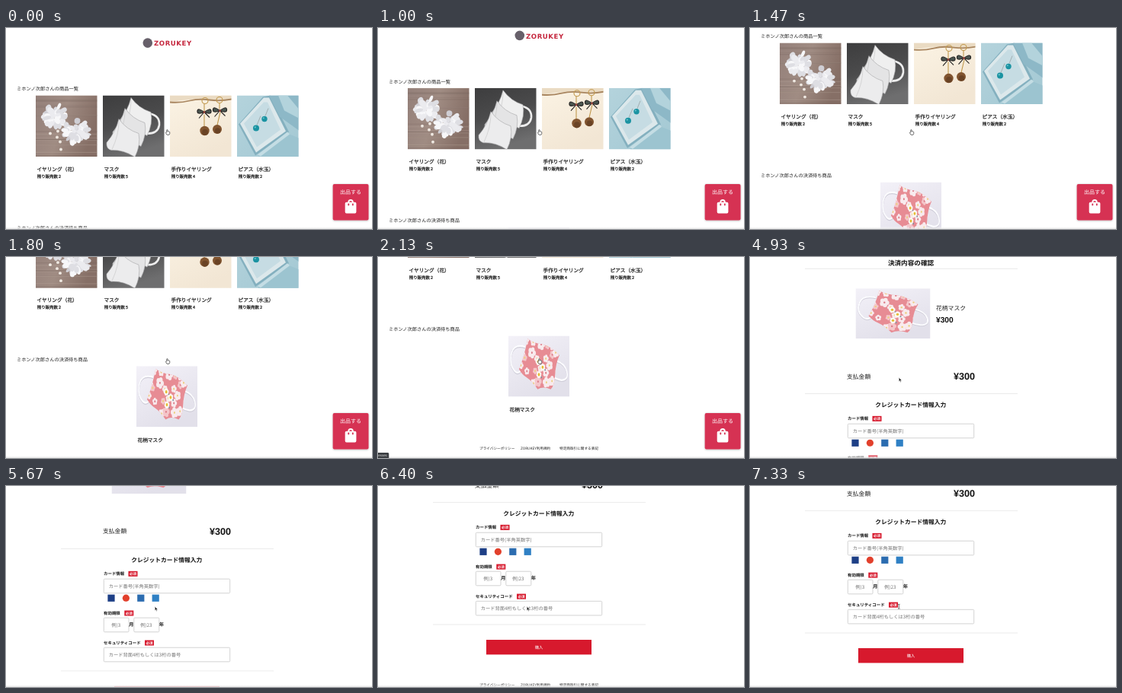
Recreate the animation shown at these times as an HTML page. Size 480 by 264 pixels, loop 7390 ms.

```html
<!DOCTYPE html>
<html lang="ja">
<head>
<meta charset="utf-8">
<title>決済の流れ</title>
<style>
html, body { margin: 0; width: 100%; height: 100%; overflow: hidden; background: #fff; }
svg { display: block; width: 100vw; height: 100vh; }
text { font-family: "Noto Sans CJK JP", "Noto Sans CJK", sans-serif; text-rendering: geometricPrecision; white-space: pre; }
.latin { font-family: "Liberation Sans", sans-serif; }
.brand { font-family: "DejaVu Sans", sans-serif; letter-spacing: .55px; }
.medium { stroke: currentColor; stroke-width: .22px; color: #1c1c1c; }
</style>
</head>
<body>
<svg id="stage" viewBox="0 0 480 264">
  <defs>
    <filter id="lift" x="-20%" y="-20%" width="140%" height="140%"><feDropShadow dx="0" dy=".5" stdDeviation="1" flood-opacity=".35"/></filter>
    <linearGradient id="edge" x2="0" y2="1"><stop stop-color="#fff" stop-opacity="0"/><stop offset="1" stop-color="#e2e2e2"/></linearGradient>
    <linearGradient id="wood" x2="1" y2=".3"><stop stop-color="#94807a"/><stop offset=".5" stop-color="#a08c83"/><stop offset="1" stop-color="#866f66"/></linearGradient>
    <linearGradient id="slate" x2=".3" y2="1"><stop stop-color="#3d3d3e"/><stop offset=".5" stop-color="#4b4b4c"/><stop offset="1" stop-color="#6e6e6f"/></linearGradient>
    <linearGradient id="cream" x2=".5" y2="1"><stop stop-color="#fbf3e4"/><stop offset="1" stop-color="#f2e6d4"/></linearGradient>
    <linearGradient id="sky" x2="1" y2="1"><stop stop-color="#b4d3dc"/><stop offset="1" stop-color="#a3c8d3"/></linearGradient>
    <linearGradient id="mist" x2=".5" y2="1"><stop stop-color="#f3f1f8"/><stop offset="1" stop-color="#e2e0ea"/></linearGradient>
    <clipPath id="square"><path d="M0 0H80.5V80.5H0z"/></clipPath>
    <clipPath id="wide"><path d="M0 0H98V66H0z"/></clipPath>
    <path id="body" d="M31 3Q40 8 54 9Q68 11 82 21Q76 30 75 42Q74 54 68 58Q56 54 47 58Q38 49 29 45Q22 42 17 36Q25 24 31 3z"/>
    <clipPath id="cloth"><use href="#body"/></clipPath>
    <g id="flowerPair" clip-path="url(#square)"></g>
    <g id="masks" clip-path="url(#square)">
      <path fill="url(#slate)" d="M0 0H81V81H0z"/>
      <g id="maskStack"></g>
    </g>
    <g id="pompoms" clip-path="url(#square)">
      <path fill="url(#cream)" d="M0 0H81V81H0z"/>
      <path fill="#eadbc3" d="M0 0H81V5Q60 8 40 6T0 9z"/>
      <path fill="none" stroke="#a98660" stroke-width="1.8" d="M0 9Q14 10 26 7T52 6T81 5"/>
      <g fill="none" stroke="#c1994e" stroke-width="1.1"><path d="M45 11V21M45 25V41M65 10V18M66 22L62 39"/><circle cx="46" cy="7" r="4"/><circle cx="65" cy="6" r="4"/></g>
      <g fill="#4b5650" stroke="#262423" stroke-width="1.1"><path id="bow" d="M45 22Q37 16 36 20Q35 26 45 22Q53 16 54 20Q55 26 45 22L38 30M45 22L52 29"/><use href="#bow" transform="translate(20.5 -2)"/></g>
      <circle cx="45" cy="22" r="1.5" fill="#99483f"/><circle cx="65.5" cy="20" r="1.5" fill="#99483f"/>
      <g fill="#81542f"><circle cx="45.5" cy="46.5" r="6.2"/><circle cx="62" cy="44.5" r="6"/></g>
      <g fill="#5b381f" opacity=".6"><circle cx="46" cy="48.5" r="4"/><circle cx="62.5" cy="46.5" r="3.8"/></g>
    </g>
    <g id="drops" clip-path="url(#square)">
      <path fill="url(#sky)" d="M0 0H81V81H0z"/>
      <path fill="#84b0bf" d="M2 38L34 2L44 0L68 48L24 79z"/>
      <path fill="#dce8eb" d="M4 37L35 3L42 3L64 47L25 75z"/>
      <path fill="#c6dce3" d="M9 37L35 9L40 9L57 45L26 68z"/>
      <path fill="#8db8c7" d="M42 0H81V46L56 28z"/><path fill="#b3d3dc" d="M54 0H66L81 18V30L62 20z"/>
      <path fill="#9cc4d0" d="M28 79L66 50L81 56V81H28z"/><path fill="#c4dde4" d="M27 78L66 48L69 51L31 80z"/>
      <path fill="none" stroke="#98a2a4" stroke-width=".8" d="M26 39L31 27M37 27L41 17"/>
      <circle cx="25" cy="43" r="4" fill="#1a93a2"/><circle cx="36" cy="31" r="3.7" fill="#1a93a2"/>
      <circle cx="23.8" cy="41.8" r="1.1" fill="#6fc5cd"/><circle cx="34.8" cy="29.8" r="1" fill="#6fc5cd"/>
    </g>
    <g id="floral" clip-path="url(#wide)">
      <path fill="url(#mist)" d="M0 0H98V66H0z"/>
      <g id="straps" fill="none" stroke-width="2"><path id="loops" stroke="#cfcdd8" d="M27 13Q9 9 5 20T9 38Q14 43 20 39M77 28Q91 31 94 40T85 49Q78 48 73 46"/><use href="#loops" style="stroke:#fcfcff" y="-.8"/><path stroke="#fcfcff" d="M27 12Q9 8 5 19T9 37Q14 42 20 38M77 27Q91 30 94 39T85 48Q78 47 73 45"/></g>
      <use href="#body" fill="#e78c94"/>
      <g id="petals" clip-path="url(#cloth)"></g>
    </g>
  </defs>
  <rect width="480" height="264" fill="#fff"/>
  <g id="shop"></g>
  <g id="pay"></g>
  <g id="sell">
    <rect x="428.7" y="204.9" width="46.8" height="47.6" rx="2" fill="#d63252" filter="url(#lift)"/>
    <path fill="#fff" transform="translate(441 223.2) scale(.92)" d="M18 6h-2a4 4 0 0 0-8 0H6a2 2 0 0 0-2 2v12a2 2 0 0 0 2 2h12a2 2 0 0 0 2-2V8a2 2 0 0 0-2-2zM10 10a1 1 0 0 1-2 0V8h2zM12 4a2 2 0 0 1 2 2h-4a2 2 0 0 1 2-2zM16 10a1 1 0 0 1-2 0V8h2z"/>
  </g>
  <rect y="260.5" width="480" height="3.5" fill="url(#edge)"/>
  <g id="status"><path fill="#3b3e42" d="M0 257H13Q14.3 257 14.3 258.5V264H0z"/></g>
  <path id="hand" fill="#fff" stroke="#333" stroke-width=".7" stroke-linejoin="round" d="M-1.2 .6V-2.6Q-.6 -3.6 0 -2.6V-.6Q1.8 -1 2.7 0Q3.2 2.4 2 3.8H-1Q-2 2.2 -2.7 .9Q-2.3 -.1 -1.2 .6z"/>
  <path id="arrow" fill="#111" stroke="#fff" stroke-width=".5" d="M0 0V5.2L1.2 4.2L2 6.1L2.9 5.7L2.1 3.9H3.7z"/>
  <path id="beam" fill="none" stroke="#333" stroke-width=".7" d="M-1.3 -3Q0 -3 0 -2.2V2.2Q0 3 -1.3 3M1.3 -3Q0 -3 0 -2.2M0 2.2Q0 3 1.3 3"/>
</svg>
<script>
const LOOP = 7390, FPS = 15;
const RED = '#d7192d';
const $ = id => document.getElementById(id);

function add(parent, tag, attrs, content) {
  const el = document.createElementNS('http://www.w3.org/2000/svg', tag);
  for (const k in attrs) el.setAttribute(k, attrs[k]);
  if (content) el.textContent = content;
  parent.appendChild(el);
  return el;
}

// y is the optical middle of the line
const label = (parent, str, x, y, size, opts = {}) =>
  add(parent, 'text', { x, y: y + size * .37, 'font-size': size, fill: '#1c1c1c', ...opts }, str);
const box = (parent, x, y, width, height, opts) => add(parent, 'rect', { x, y, width, height, ...opts });
const rule = (parent, y) => box(parent, 72, y - .35, 279, .7, { fill: '#e3e3e3' });
const MEDIUM = { class: 'medium' };

function random(seed) {
  return () => (seed = (seed * 16807) % 2147483647) / 2147483647;
}

function blossom(parent, cx, cy, r, petals, fill) {
  for (let i = 0; i < petals; i++) {
    const a = i / petals * Math.PI * 2 + cx;
    add(parent, 'circle', { cx: cx + Math.cos(a) * r * .6, cy: cy + Math.sin(a) * r * .6, r: r * .5, fill });
  }
}

// Loose cluster of overlapping cloth petals
function ruffle(parent, cx, cy, rx, ry, rnd) {
  const tones = ['#cfced4', '#dedee3', '#ebebef', '#f7f7f9'];
  for (let i = 0; i < 44; i++) {
    const a = rnd() * Math.PI * 2, d = Math.sqrt(rnd()) * .78;
    const x = cx + Math.cos(a) * d * rx, y = cy + Math.sin(a) * d * ry;
    add(parent, 'ellipse', { rx: 3 + rnd() * 3, ry: 2 + rnd() * 2, fill: tones[i < 12 ? i % 2 : 1 + i % 3],
      transform: `translate(${x} ${y}) rotate(${a * 57})` });
  }
}

function drawPhotos() {
  const g = $('flowerPair'), rnd = random(41);
  box(g, 0, 0, 81, 81, { fill: 'url(#wood)' });
  for (let i = 0; i < 22; i++)
    box(g, 0, rnd() * 80, 81, .4 + rnd(), { fill: rnd() < .5 ? '#75615a' : '#b7a49c', opacity: .28 });
  ruffle(g, 25, 27, 18, 19, rnd);
  ruffle(g, 53, 47, 20, 20, rnd);
  for (const [cx, cy] of [[19, 50], [29, 47], [28, 55], [32, 61], [33, 71]])
    add(g, 'circle', { cx, cy, r: 1.9, fill: '#efe9e2' });

  const stack = $('maskStack');
  for (let i = 0; i < 3; i++) {
    const m = add(stack, 'g', { transform: `translate(${-8 * i} ${14 * i})` });
    if (!i) add(m, 'path', { d: 'M62 24Q75 27 74 39Q72 51 57 50', fill: 'none', stroke: '#ededed', 'stroke-width': 2.6 });
    add(m, 'path', { d: 'M37 3Q47 17 63 22Q66 37 58 53Q43 43 27 44Q20 42 21 34Q33 20 37 3z', fill: ['#efefef', '#e4e4e5', '#ececed'][i], stroke: '#a5a5a6', 'stroke-width': .6 });
    add(m, 'path', { d: 'M37 6Q37 24 28 43', fill: 'none', stroke: '#c4c4c5', 'stroke-width': .6 });
  }

  const p = $('petals'), r = random(77);
  for (let i = 0; i < 28; i++) {
    const x = 15 + (i % 7) * 10 + r() * 8, y = 4 + (i / 7 | 0) * 14 + r() * 10;
    blossom(p, x, y, 3.4 + r() * 2.4, 5, i % 4 ? '#f8ebee' : '#f4c6ca');
    add(p, 'circle', { cx: x, cy: y, r: 1.2, fill: i % 3 ? '#ecd07f' : '#dc7d89' });
  }
  for (const [x, y] of [[48, 28], [55, 34], [49, 42]]) {
    blossom(p, x, y, 3.8, 6, '#fbf8f3');
    add(p, 'circle', { cx: x, cy: y, r: 1.7, fill: '#e5bd35' });
    add(p, 'circle', { cx: x + 4, cy: y + 3, r: 1, fill: '#7893a0' });
  }
}

function header(g) {
  add(g, 'circle', { cx: 185.8, cy: 19.6, r: 6.3, fill: '#67606a' });
  label(g, 'ZORUKEY', 194, 20.2, 8.6, { class: 'brand', 'font-weight': 700, fill: '#c5283f' });
}

function footer(g, y) {
  const items = [['プライバシーポリシー', 133], ['ZORUKEY利用規約', 187], ['特定商取引に関する表記', 238]];
  for (const [s, x] of items) label(g, s, x, y, 4.65);
}

function drawShop() {
  const g = $('shop');
  header(g);
  label(g, 'ミホンノ次郎さんの商品一覧', 14, 80, 6.27);
  const goods = [['イヤリング（花）', 2, 'flowerPair'], ['マスク', 5, 'masks'], ['手作りイヤリング', 4, 'pompoms'], ['ピアス（水玉）', 2, 'drops']];
  goods.forEach(([name, left, photo], i) => {
    const x = 39 + i * 88;
    add(g, 'use', { href: '#' + photo, transform: `translate(${x} 88.5)` });
    label(g, name, x + 1.5, 185.2, 6.7, MEDIUM);
    label(g, '残り販売数 ' + left, x + 1.7, 194.5, 5.45, MEDIUM);
  });
  label(g, 'ミホンノ次郎さんの決済待ち商品', 14, 262.5, 6.22);
  add(g, 'use', { href: '#floral', transform: 'translate(171 271.5) scale(.8163 1.2121)' });
  label(g, '花柄マスク', 172.5, 368.5, 6.7, MEDIUM);
  footer(g, 419);
}

function field(g, x, y, width, hint, dx) {
  box(g, x, y, width, 18.6, { rx: 1.2, fill: '#fff', stroke: '#c8c8c8', 'stroke-width': .8 });
  label(g, hint, x + dx, y + 9.3, 6.25, { fill: '#757575' });
}

function fieldName(g, str, y, badgeX) {
  label(g, str, 128, y, 5.45, { 'font-weight': 700, fill: '#111' });
  box(g, badgeX, y - 3.4, 12, 7, { fill: RED });
  label(g, '必須', badgeX + 6, y, 4.6, { fill: '#fff', 'font-weight': 700, 'text-anchor': 'middle' });
}

function drawPay() {
  const g = $('pay'), bold = { 'font-weight': 700, fill: '#111' }, mid = { ...bold, 'text-anchor': 'middle' };
  const price = { ...bold, class: 'latin' };
  header(g);
  label(g, '決済内容の確認', 211, 81, 8.6, mid);
  rule(g, 88.5);
  add(g, 'use', { href: '#floral', id: 'photo', transform: 'translate(138.5 114.4)' });
  label(g, '花柄マスク', 244, 140, 7.8);
  label(g, '¥300', 244, 155.5, 10.2, price);
  label(g, '支払金額', 127, 229.7, 7.8);
  label(g, '¥300', 267, 229.2, 12.6, price);
  rule(g, 252.7);
  label(g, 'クレジットカード情報入力', 210.7, 267, 7.75, mid);
  fieldName(g, 'カード情報', 285.3, 160.5);
  field(g, 128.3, 292.2, 165.4, 'カード番号(半角英数字)', 6.5);
  ['#1d3f86', '#e2402c', '#2b6cb0', '#2f80c4'].forEach((fill, i) => {
    const x = 138 + i * 19.4;
    if (i === 1) add(g, 'circle', { cx: x, cy: 317.3, r: 4.6, fill });
    else box(g, x - 4.6, 312.7, 9.2, 9.2, { fill });
  });
  fieldName(g, '有効期限', 337, 155.3);
  field(g, 128.3, 343.2, 32.7, '例)3', 10);
  field(g, 167.8, 343.2, 33, '例)23', 8.3);
  label(g, '月', 161.2, 352.2, 6.2, MEDIUM);
  label(g, '年', 200.7, 352.2, 6.2, MEDIUM);
  fieldName(g, 'セキュリティコード', 376, 182);
  field(g, 128.3, 382.3, 165.4, 'カード背面4桁もしくは3桁の番号', 6.5);
  rule(g, 413);
  box(g, 142, 433, 138, 19.4, { fill: RED });
  label(g, '購入', 211, 442.7, 5.3, { 'text-anchor': 'middle', fill: '#fff', 'font-weight': 500 });
  footer(g, 492);
}

// Monotone cubic through [time, value] points, at rest at both ends
function glide(points) {
  const rate = i => (points[i + 1][1] - points[i][1]) / (points[i + 1][0] - points[i][0]);
  const slopes = points.map((_, i) => {
    if (!i || i === points.length - 1) return 0;
    const a = rate(i - 1), b = rate(i);
    return a * b > 0 ? 2 * a * b / (a + b) : 0;
  });
  return t => {
    if (t <= points[0][0]) return points[0][1];
    const i = points.findIndex(p => p[0] > t) - 1;
    if (i < 0) return points[points.length - 1][1];
    const [t0, v0] = points[i], [t1, v1] = points[i + 1];
    const h = t1 - t0, u = (t - t0) / h, w = 1 - u;
    return v0 * w * w * (1 + 2 * u) + v1 * u * u * (3 - 2 * u) + h * u * w * (slopes[i] * w - slopes[i + 1] * u);
  };
}

const shopScroll = glide([[800, 0], [1467, 69], [2133, 168], [2400, 168.6]]);
const payScroll = glide([[4330, 0], [4933, 73], [6400, 231], [7000, 236], [7140, 236], [7200, 226], [7333, 220]]);
const pointerX = glide([[2470, 212], [3470, 193.5], [3870, 193.5], [4130, 195.3]]);
const pointerY = glide([[2470, 136.5], [3470, 153.3], [3870, 153.3], [4130, 158.3]]);

const show = (id, on) => $(id).setAttribute('display', on ? 'inline' : 'none');
const move = (id, x, y) => $(id).setAttribute('transform', `translate(${x.toFixed(2)} ${y.toFixed(2)})`);

function render(time) {
  const t = Math.floor((time + 5) * FPS / 1000) * 1000 / FPS;
  const paying = t >= 3725;
  show('shop', !paying);
  show('sell', !paying);
  show('pay', paying);
  show('photo', t >= 3925);
  show('status', t >= 2060 && t < 4060);
  move('shop', 0, -shopScroll(t));
  move('pay', 0, -payScroll(t));

  const pointer = t < 3990 ? 'hand' : t < 6925 ? 'arrow' : 'beam';
  for (const id of ['hand', 'arrow', 'beam']) {
    show(id, id === pointer);
    move(id, pointerX(t), pointerY(t));
  }
}

drawPhotos();
drawShop();
drawPay();
label($('sell'), '出品する', 452, 215.6, 7, { 'text-anchor': 'middle', fill: '#fff', 'font-weight': 500 });
label($('status'), 'esses', .3, 260.6, 4.4, { class: 'latin', fill: '#ddd' });

const start = performance.now();
function tick() {
  render((performance.now() - start) % LOOP);
  requestAnimationFrame(tick);
}
tick();
</script>
</body>
</html>
```
